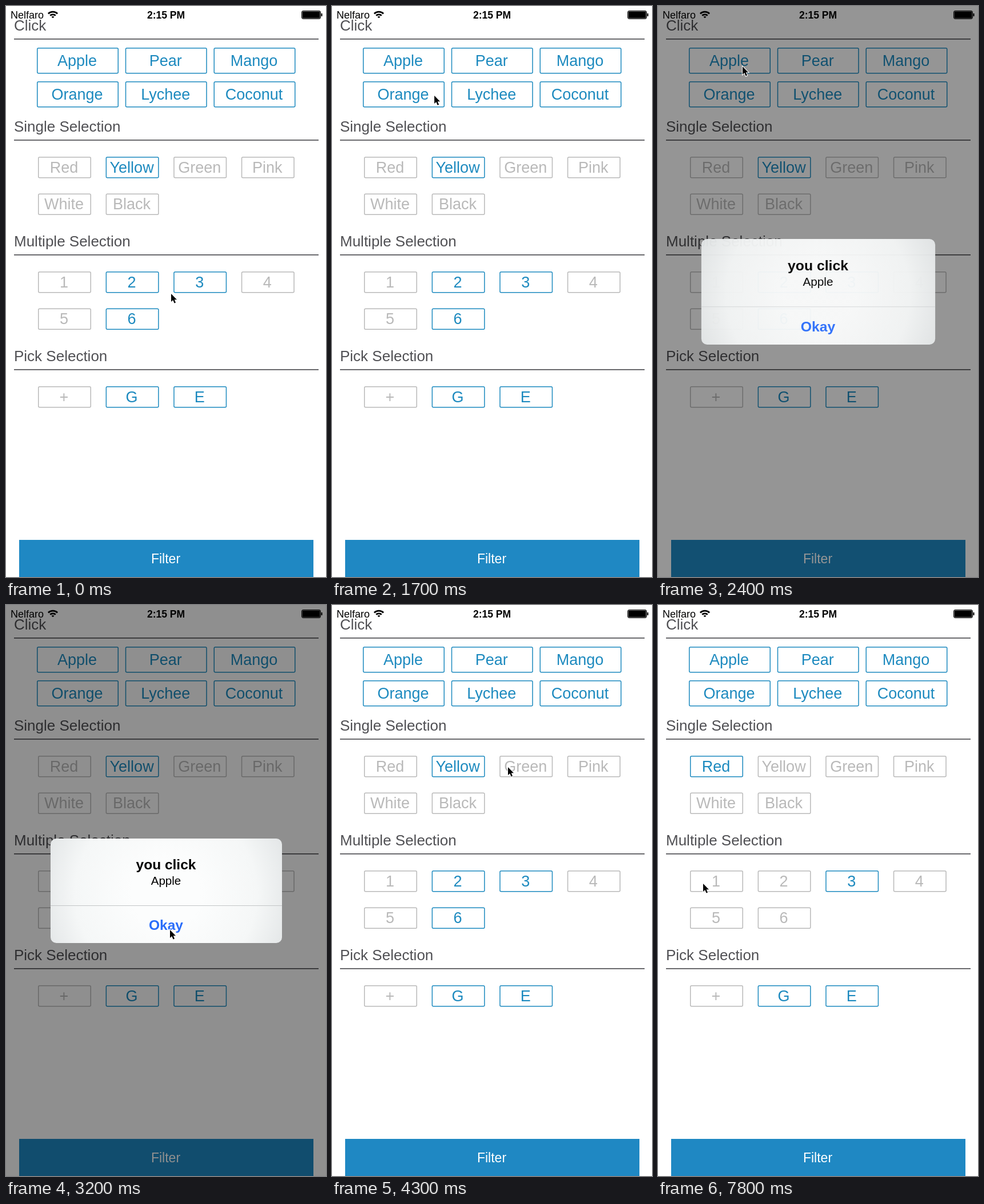
An HTML page with a canvas that plays this animation: 560x1000 px, repeating every 8 s.

```html
<!DOCTYPE html>
<html lang="en">
<head>
<meta charset="utf-8">
<title>Tag buttons</title>
<style>
html, body { margin: 0; width: 100%; height: 100%; overflow: hidden; background: #fff; }
canvas { display: block; }
</style>
</head>
<body>
<canvas id="stage" width="560" height="1000"></canvas>
<script>
const ctx = document.getElementById('stage').getContext('2d');
const LOOP = 8000, STEP = 100, MOVE = 600;
const BLUE = '#1d8abf', GREY = '#b9b9b9', INK = '#505054';

// Pointer stops: arrival time and place; each move takes at most MOVE ms
const stops = [
  { t: 0, x: 289, y: 504 },
  { t: 700, x: 497, y: 206 },
  { t: 1300, x: 190, y: 175 },
  { t: 2100, x: 148, y: 106 },
  { t: 3100, x: 287, y: 569 },
  { t: 4200, x: 308, y: 284 },
  { t: 5300, x: 98, y: 282 },
  { t: 6000, x: 268, y: 518 },
  { t: 6500, x: 222, y: 545 },
  { t: 6800, x: 222, y: 484 },
  { t: 7800, x: 79, y: 488 }
];

const clamp = v => Math.min(1, Math.max(0, v));
const smooth = p => p * p * (3 - 2 * p);
const ramp = (t, start, length) => clamp((t - start) / length);

function text(str, x, y, size, color, align = 'center', weight = 400) {
  ctx.font = `${weight} ${size}px "Liberation Sans", Arial, sans-serif`;
  ctx.textAlign = align;
  ctx.fillStyle = color;
  ctx.fillText(str, x, y);
}

function rect(x, y, w, h, color) {
  ctx.fillStyle = color;
  ctx.fillRect(x, y, w, h);
}

function roundRect(x, y, w, h, r) {
  ctx.beginPath();
  ctx.roundRect(x, y, w, h, r);
}

function button(label, x, y, w, h, color) {
  roundRect(x + 0.75, y + 0.75, w - 1.5, h - 1.5, 2);
  ctx.strokeStyle = color;
  ctx.lineWidth = 1.5;
  ctx.stroke();
  text(label, x + w / 2 - 1, y + h / 2 + 9, 27, color);
}

function heading(label, y) {
  text(label, 14, y, 26, INK, 'left');
  rect(14, y + 14, 533, 1.7, INK);
}

function section(title, row, labels, selected) {
  const y = 220 + 201 * row;
  heading(title, y);
  labels.forEach((label, i) => button(label, 56 + 118.6 * (i % 4), y + 44 + 64.5 * (i >> 2),
    93, 37.5, selected.includes(label) ? BLUE : GREY));
}

function statusBar() {
  text('Nelfaro', 8, 22, 18, '#000', 'left');
  text('2:15 PM', 280, 22, 17.5, '#000', 'center', 700);

  ctx.strokeStyle = '#000';
  ctx.lineWidth = 2.8;
  for (let radius = 2; radius < 12; radius += 4.7) {
    ctx.beginPath();
    ctx.arc(82, 21.5, radius, -Math.PI * 0.75, -Math.PI * 0.25);
    ctx.stroke();
  }

  roundRect(517.5, 8.5, 33, 14, 2.5);
  ctx.lineWidth = 1;
  ctx.stroke();
  rect(518.5, 9.5, 31, 12, '#000');
  rect(551.5, 13, 2, 5, '#000');
}

function page(t) {
  rect(0, 0, 560, 1000, '#fff');
  heading('Click', 43);
  ['Apple', 'Pear', 'Mango', 'Orange', 'Lychee', 'Coconut'].forEach((label, i) =>
    button(label, 54 + 154.75 * (i % 3), 73 + 59 * Math.floor(i / 3), 143, 45.5, BLUE));

  const color = t < 4600 ? 'Yellow' : t < 5400 ? 'Green' : 'Red';
  const numbers = t < 6600 ? '236' : t < 7100 ? '23' : '3';
  section('Single Selection', 0, ['Red', 'Yellow', 'Green', 'Pink', 'White', 'Black'], color);
  section('Multiple Selection', 1, [...'123456'], numbers);
  section('Pick Selection', 2, [...'+GE'], 'GE');

  rect(23, 935, 515, 65, '#1f88c3');
  text('Filter', 279.5, 976, 23, '#fff');
  statusBar();
}

function alertBox(t) {
  const shown = 1 - (1 - ramp(t, 2150, 400)) ** 3;
  const alpha = shown * (1 - smooth(ramp(t, 3300, 400)));
  if (!alpha) return;
  rect(0, 0, 560, 1000, `rgba(0, 0, 0, ${0.44 * alpha})`);

  const scale = 1.2 - 0.2 * shown;
  ctx.save();
  ctx.globalAlpha = alpha;
  ctx.translate(280.5, 500);
  ctx.scale(scale, scale);
  ctx.translate(-280.5, -500);

  const glow = ctx.createRadialGradient(280, 505, 60, 280, 505, 225);
  glow.addColorStop(0, '#fcfdfd');
  glow.addColorStop(0.6, '#f5f7f7');
  glow.addColorStop(1, '#e3e6e7');
  roundRect(78, 409, 405, 183, 10);
  ctx.fillStyle = glow;
  ctx.fill();

  text('you click', 280, 463, 24.5, '#000', 'center', 700);
  text('Apple', 280, 490, 20.5, '#000');
  text('Okay', 280, 569, 24.5, '#2a6dfa', 'center', 700);
  ctx.globalAlpha = alpha ** 8;
  rect(78, 526, 405, 1, '#c3c6c7');
  ctx.restore();
}

function pointer(t) {
  let { x, y } = stops[0];
  stops.slice(1).forEach((stop, i) => {
    const length = Math.min(MOVE, stop.t - stops[i].t);
    const p = smooth(ramp(t, stop.t - length, length));
    x += (stop.x - x) * p;
    y += (stop.y - y) * p;
  });

  const arrow = new Path2D('M0 0V14L3.2 11 5.6 16.6 8 15.6 5.7 10.2H10Z');
  ctx.save();
  ctx.translate(x, y);
  ctx.strokeStyle = '#fff';
  ctx.lineWidth = 2;
  ctx.stroke(arrow);
  ctx.fillStyle = '#000';
  ctx.fill(arrow);
  ctx.restore();
}

function draw() {
  const t = Math.floor(performance.now() % LOOP / STEP) * STEP;
  page(t);
  alertBox(t);
  pointer(t);
  requestAnimationFrame(draw);
}
draw();
</script>
</body>
</html>
```
